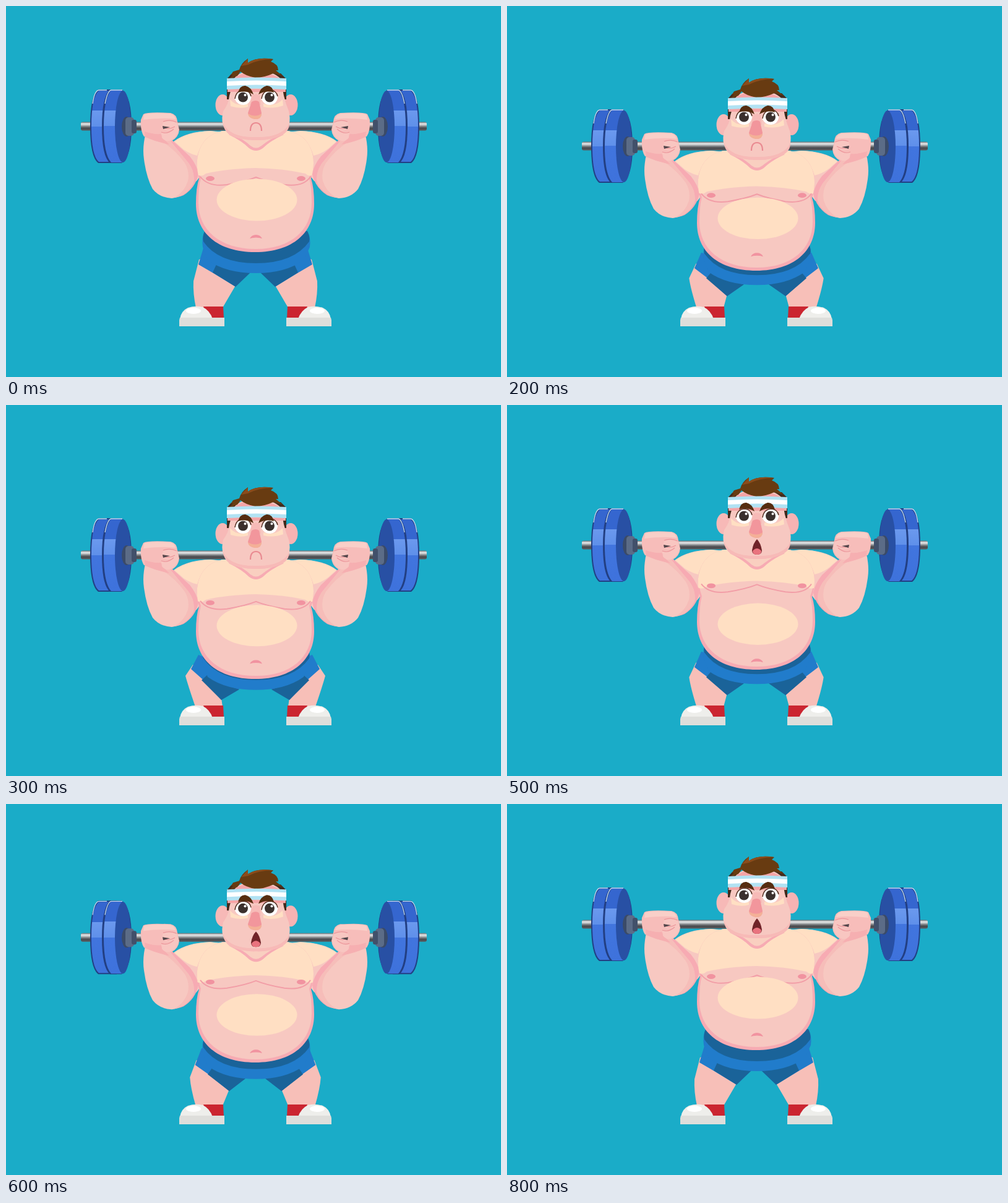
Write an HTML page that moves like this. It is 800 px wide and 600 px high and loops after 1.1 s.

```html
<!DOCTYPE html>
<html lang="en">
<head>
<meta charset="utf-8">
<title>Squat</title>
<style>
html, body { margin: 0; width: 100%; height: 100%; overflow: hidden; background: #1aacc8; }
svg { display: block; width: 800px; height: 600px; }
</style>
</head>
<body>
<svg viewBox="0 0 800 600">
  <defs>
    <linearGradient id="steel" x2="0" y2="1">
      <stop offset="0" stop-color="#6b6e72"/><stop offset=".2" stop-color="#e4e6e7"/>
      <stop offset=".36" stop-color="#c4c6c8"/><stop offset=".5" stop-color="#85888b"/>
      <stop offset=".72" stop-color="#48484c"/><stop offset="1" stop-color="#5c5d61"/>
    </linearGradient>
    <linearGradient id="rim" x2="0" y2="1">
      <stop offset=".28" stop-color="#3566cf"/><stop offset=".28" stop-color="#6b99ee"/>
      <stop offset=".5" stop-color="#5f90ea"/><stop offset=".5" stop-color="#4175de"/>
      <stop offset="1" stop-color="#3e72dc"/>
    </linearGradient>
    <clipPath id="trunk"><path id="trunkShape" d="M350 202Q322 208 313 232Q305 252 312 279Q307 294 307 320C307 366 341 398 403 398C464 398 498 366 498 320Q498 294 493 279Q501 252 493 232Q484 208 456 202Z"/></clipPath>

    <g id="plates">
      <path d="M149 135H179V254H149Q136 244 136 195Q136 145 149 135Z" fill="#223f83"/>
      <path d="M150 137H170V252H150Q138 242 138 195Q138 147 150 137Z" fill="url(#rim)"/>
      <path d="M168 135H187Q203 146 203 195Q203 243 187 254H168Q155 243 155 195Q155 147 168 135Z" fill="#223f83"/>
      <path d="M170 136H188V253H170Q158 240 158 195Q158 150 170 136Z" fill="url(#rim)"/>
      <ellipse cx="189" cy="195" rx="13" ry="58" fill="#2850a4"/>
      <path d="M140 158Q143 137 150 136H163M160 158Q164 137 170 136H188" fill="none" stroke="#c4def5" stroke-width="1.3"/>
      <ellipse cx="195" cy="195" rx="8" ry="16" fill="#3b4b68"/>
      <rect x="193" y="180" width="14" height="30" rx="5" fill="#5b6c87"/>
      <rect x="203" y="184" width="8" height="22" rx="3" fill="#42506a"/>
    </g>

    <g id="arm">
      <path d="M271 219Q292 203 330 202L353 204L318 270L308 283L290 290L276 234Z" fill="#f7c8c1"/>
      <path d="M272 219Q292 204 330 202L346 204Q316 216 309 242Q292 238 280 226Z" fill="#ffdfc3"/>
      <path d="M264 213Q284 231 297 243Q309 258 311 272Q306 294 287 306Q276 311 264 310L250 240Z" fill="#f7abb3"/>
      <path d="M226 205Q220 228 223 248Q227 278 237 296Q248 310 268 311Q292 307 303 286Q306 269 295 254L262 214Z" fill="#f7c8c1"/>
      <path d="M252 219Q274 233 289 254Q297 267 294 283Q289 300 272 310Q294 306 303 286Q306 269 295 254L264 217Z" fill="#f6bdb9"/>
    </g>
    <g id="fist">
      <path d="M222 175Q228 171 266 173Q276 175 277 187L280 200Q279 212 268 218Q258 222 252 215L223 211Q217 202 218 184Z" fill="#f7bdba"/>
      <path d="M223 176Q230 172 265 174Q273 176 274 183Q254 180 222 184Z" fill="#f9cfc8"/>
      <path d="M224 203Q239 208 250 207L257 217L264 224Q243 220 225 212Z" fill="#f6afb1"/>
      <path d="M254 187Q267 182 276 188L279 200Q277 211 267 217Q258 221 252 213L251 204Q263 207 269 200Q257 204 252 196Z" fill="#f8c6c1"/>
      <path d="M254 187Q265 183 276 188M253 196Q263 201 273 195M251 204Q261 208 271 199" fill="none" stroke="#eb959a" stroke-width="1.2"/>
      <path d="M253 194L265 196L254 199Z" fill="#54464b"/>
    </g>

    <g id="shoe">
      <path d="M319 486H351L352 505H325Z" fill="#cb2530"/>
      <path d="M281 506Q283 493 294 488Q306 484 318 487Q329 492 334 506Z" fill="#eeeeeb"/>
      <ellipse cx="303" cy="493" rx="12" ry="5" fill="#fff"/>
      <path d="M281 504H353V518H280V508Z" fill="#dededb"/>
    </g>
    <g id="leg">
      <path id="skin" fill="#f7bfb8"/>
      <path id="cloth" fill="#217ccb"/>
      <path id="inner" fill="#1a6399"/>
    </g>
    <g id="eye">
      <path d="M370 151Q371 136 384 136Q396 137 396 149Q394 159 384 160Q374 160 370 151Z" fill="#fff"/>
      <circle cx="383" cy="147.500" r="8" fill="#3a302d"/>
      <circle cx="386.500" cy="144" r="2" fill="#fff"/>
      <path d="M370 150Q372 136 385 136Q394 137 396 146" fill="none" stroke="#563022" stroke-width="1.5"/>
    </g>
    <path id="brow" d="M375 140Q378 128 387 129Q396 131 400 143Q388 136 375 140Z" fill="#562d10"/>
  </defs>

  <rect width="800" height="600" fill="#1aacc8"/>
  <use href="#leg"/><use href="#leg" transform="matrix(-1 0 0 1 806 0)"/>
  <use href="#shoe"/><use href="#shoe" transform="matrix(-1 0 0 1 806 0)"/>
  <g id="waist">
    <path d="M321 364Q316 375 318 390L326 411Q355 432 404 432Q452 432 481 411L491 390Q493 375 487 364Z" fill="#217ccb"/>
    <path d="M321 364Q317 374 319 381Q343 416 404 416Q465 416 490 381Q492 374 487 364Z" fill="#1a6399"/>
  </g>

  <g id="upper">
    <rect x="121" y="187.500" width="559" height="14" rx="3" fill="url(#steel)"/>
    <use href="#plates"/><use href="#plates" transform="matrix(-1 0 0 1 804 0)"/>
    <use href="#arm"/><use href="#arm" transform="matrix(-1 0 0 1 806 0)"/>
    <use href="#fist"/><use href="#fist" transform="matrix(-1 0 0 1 806 0)"/>

    <g id="torso">
      <use href="#trunkShape" fill="#f7abb3"/>
      <g clip-path="url(#trunk)">
        <path d="M350 202Q322 208 313 232Q306 254 315 278Q311 292 311 318C311 362 345 393 404 393C461 393 494 362 494 318Q494 292 490 278Q500 252 493 232Q484 208 456 202Z" fill="#f7c8c1"/>
        <path id="glow" d="M300 180H506V266Q493 280 484 271Q450 263 404 262Q357 263 323 271Q313 280 300 266Z" fill="#ffdfc3"/>
        <g id="chest">
          <path d="M314 276Q327 293 357 289Q387 284 404 277Q421 284 450 289Q481 293 492 276" fill="none" stroke="#f29ea7" stroke-width="2"/>
          <ellipse cx="330" cy="279" rx="7" ry="4" fill="#f193a0"/>
          <ellipse cx="477" cy="279" rx="7" ry="4" fill="#f193a0"/>
        </g>
        <g id="belly">
          <ellipse cx="405.500" cy="313.500" rx="65" ry="34" fill="#ffdfc3"/>
          <path d="M394 376Q397 370 404 370Q411 370 414 376Q404 373 394 376Z" fill="#f193a0"/>
        </g>
      </g>
    </g>

    <path d="M360 208Q381 218 393 230Q404 238 415 230Q427 218 449 208Z" fill="#f7abb3"/>
    <path d="M362 205Q385 216 395 226Q404 233 413 226Q425 216 447 205Z" fill="#f9cfc0"/>
    <ellipse cx="350" cy="160" rx="11.500" ry="17" fill="#f7b9b7"/>
    <ellipse cx="460" cy="160" rx="11.500" ry="17" fill="#f7b3b3"/>
    <path d="M364 110L357 118V151H453V118L444 109Z" fill="#432a1c"/>
    <path d="M369 117Q378 104 404 105Q433 105 444 118L449 145Q452 158 457 170Q463 194 447 208Q427 218 404 217Q381 218 361 208Q345 194 351 170Q360 158 361 145Z" fill="#f7c8c1"/>
    <path d="M351 190Q362 213 404 212Q446 213 458 190Q458 203 444 210Q424 218 404 217Q382 218 361 208Q352 201 351 190Z" fill="#f7bab7"/>
    <path d="M362 151Q373 164 391 158V163Q379 167 363 162ZM447 151Q435 164 416 158V163Q431 167 448 161Z" fill="#ffdfc3"/>
    <path d="M369 117Q381 106 404 108Q432 108 443 118ZM358 134H452V139H358Z" fill="#f5a5a7"/>
    <path d="M363 112L367 106L377 103Q380 92 391 85L391 92Q405 82 432 86L428 90Q440 94 440 104L436 104L447 113L432 109Q417 116 403 116Q387 113 379 106L374 113L361 118L367 111Z" fill="#683b11"/>
    <path d="M380 97L391 85L391 92Q405 82 432 86Q408 86 391 95Z" fill="#8b4c1b"/>
    <path d="M357 117Q404 114 453 117V135Q404 132 357 135Z" fill="#b1e2f3"/>
    <path d="M357 122Q404 119 453 122V129Q404 126 357 129Z" fill="#fff"/>
    <use href="#eye"/><use href="#eye" x="43"/>
    <g id="brows"><use href="#brow"/><use href="#brow" transform="matrix(-1 0 0 1 808 0)"/></g>
    <path d="M398 144Q404 141 410 144L412 160H394Z" fill="#f7bab7"/>
    <path d="M397 155Q404 151 409 155L413 173Q413 183 403 183Q392 182 391 173Z" fill="#f2969c"/>
    <path d="M391 174Q403 181 413 174Q413 183 403 183Q392 182 391 174Z" fill="#f4b097"/>
    <path id="frown" d="M395 202Q395 189 404 189Q413 189 413 202" fill="none" stroke="#e98a91" stroke-width="2.200"/>
    <g id="shout">
      <path d="M404 185Q410 191 412 203Q412 210 404 210Q396 210 396 203Q398 191 404 185Z" fill="#702328"/>
      <path d="M397 204Q404 196 411 204Q411 210 404 210Q397 210 397 204Z" fill="#e9737e"/>
    </g>
  </g>
</svg>
<script>
const el = id => document.getElementById(id);
const LOOP = 1100, STEP = 100, DEPTH = 48;

// Leg outlines: [standing, squatting]
const legs = {
  skin: ["M312 410L303 445Q302 465 307 488L350 488L371 452L394 430L340 400Z",
         "M302 420L290 438Q294 453 306 488L350 488L348 474L375 459L330 425Z"],
  cloth: ["M320 388L311 418L335 432L371 454L394 432L400 410L350 395Z",
          "M311 404L299 427L317 443L348 477L375 461L400 440L350 420Z"],
  inner: ["M340 418L334 431L371 454L395 431Q363 428 340 418Z",
          "M326 436L316 445L348 477L377 460Q347 452 326 436Z"]
};
// Soft parts lag behind the body, one value per step
const chestLag = [0, -2, -4, -6, -14, -18, -12, -6, 0];
const bellyLag = [0, 2, -1, -3, 6, 10, 7, 3, 0];

function mix([from, to], k) {
  const ends = to.match(/\d+/g);
  return from.replace(/\d+/g, n => +n + (ends.shift() - n) * k);
}

function move(id, y) {
  el(id).setAttribute("transform", `translate(0 ${y})`);
}

function draw(time) {
  const step = Math.floor(time % LOOP / STEP);
  const t = step * STEP;
  const squat = Math.max(0, Math.min(t / 300, 1, (800 - t) / 450));
  const shouting = t > 350;
  const squash = .015 * squat;
  const sag = chestLag[step] || 0;

  move("upper", DEPTH * squat);
  move("waist", DEPTH * .6 * squat);
  move("chest", sag);
  move("glow", sag / 2);
  move("belly", bellyLag[step] || 0);
  move("brows", shouting ? -3 : 0);
  el("torso").setAttribute("transform", `translate(0 ${200 * squash}) scale(1 ${1 - squash})`);
  for (const id in legs) el(id).setAttribute("d", mix(legs[id], squat));
  el("frown").style.display = shouting ? "none" : "";
  el("shout").style.display = shouting ? "" : "none";
}

const start = performance.now();
(function tick() {
  draw(performance.now() - start);
  requestAnimationFrame(tick);
})();
</script>
</body>
</html>
```
